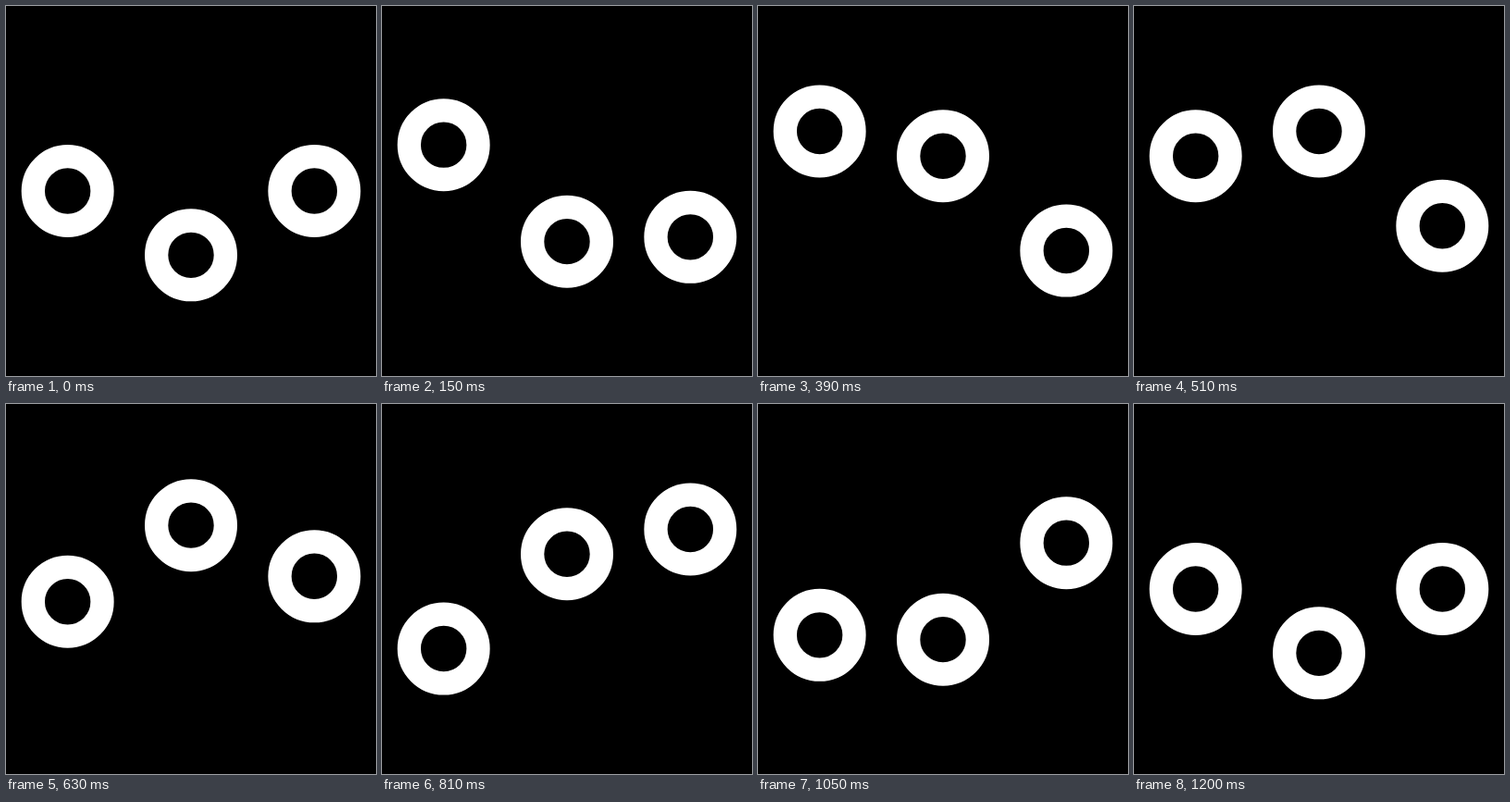
Recreate the animation shown at these times as an HTML page with a canvas. Size 400x400 px, loop 1.23 s.

```html
<!DOCTYPE html>
<html lang="en">
<head>
<meta charset="utf-8">
<title>Bouncing rings</title>
<style>
  html, body { margin: 0; width: 100%; height: 100%; overflow: hidden; background: #000; }
  canvas { display: block; }
</style>
</head>
<body>
<canvas id="stage" width="400" height="400"></canvas>
<script>
const ctx = document.getElementById('stage').getContext('2d');
const STEP = 30, STEPS = 41;
const MID = 200, SWING = 208 / 3;
const TOP = MID - SWING, BOTTOM = MID + SWING;

const bezier = (a, b, s) => 3 * a * s * (1 - s) ** 2 + 3 * b * s * s * (1 - s) + s ** 3;

// Timing curve through (x1, y1) and (x2, y2), solved by bisection.
function timing(x1, y1, x2, y2) {
  return x => {
    let low = 0, high = 1;
    for (let i = 0; i < 30; i++) {
      const s = (low + high) / 2;
      if (bezier(x1, x2, s) < x) low = s; else high = s;
    }
    return bezier(y1, y2, (low + high) / 2);
  };
}

const easeBoth = timing(0.5, 0, 0.5, 1);
const easeOut = timing(1 / 6, 1 / 6, 0.5, 1);
const easeIn = timing(0.5, 0, 5 / 6, 5 / 6);

// Each segment: start step, end step, from, to, easing.
const sideMotion = (first, second) => [
  [0, 10, MID, first, easeOut],
  [10, 30, first, second, easeBoth],
  [30, 40, second, MID, easeIn]
];

const rings = [
  { x: 200 / 3, motion: sideMotion(TOP, BOTTOM) },
  { x: 200, motion: [[0, 20, BOTTOM, TOP, easeBoth], [20, 40, TOP, BOTTOM, easeBoth]] },
  { x: 1000 / 3, motion: sideMotion(BOTTOM, TOP) }
];

function position(motion, step) {
  const [start, end, from, to, ease] = motion.find(segment => step <= segment[1]);
  return from + (to - from) * ease((step - start) / (end - start));
}

function draw(now) {
  const step = Math.floor(now / STEP) % STEPS;
  ctx.fillStyle = '#000';
  ctx.fillRect(0, 0, 400, 400);
  ctx.strokeStyle = '#fff';
  ctx.lineWidth = 25.3;
  for (const { x, motion } of rings) {
    ctx.beginPath();
    ctx.arc(x, position(motion, step), 37.35, 0, Math.PI * 2);
    ctx.stroke();
  }
}

const began = performance.now();
function tick() {
  draw(performance.now() - began);
  requestAnimationFrame(tick);
}
tick();
</script>
</body>
</html>
```
